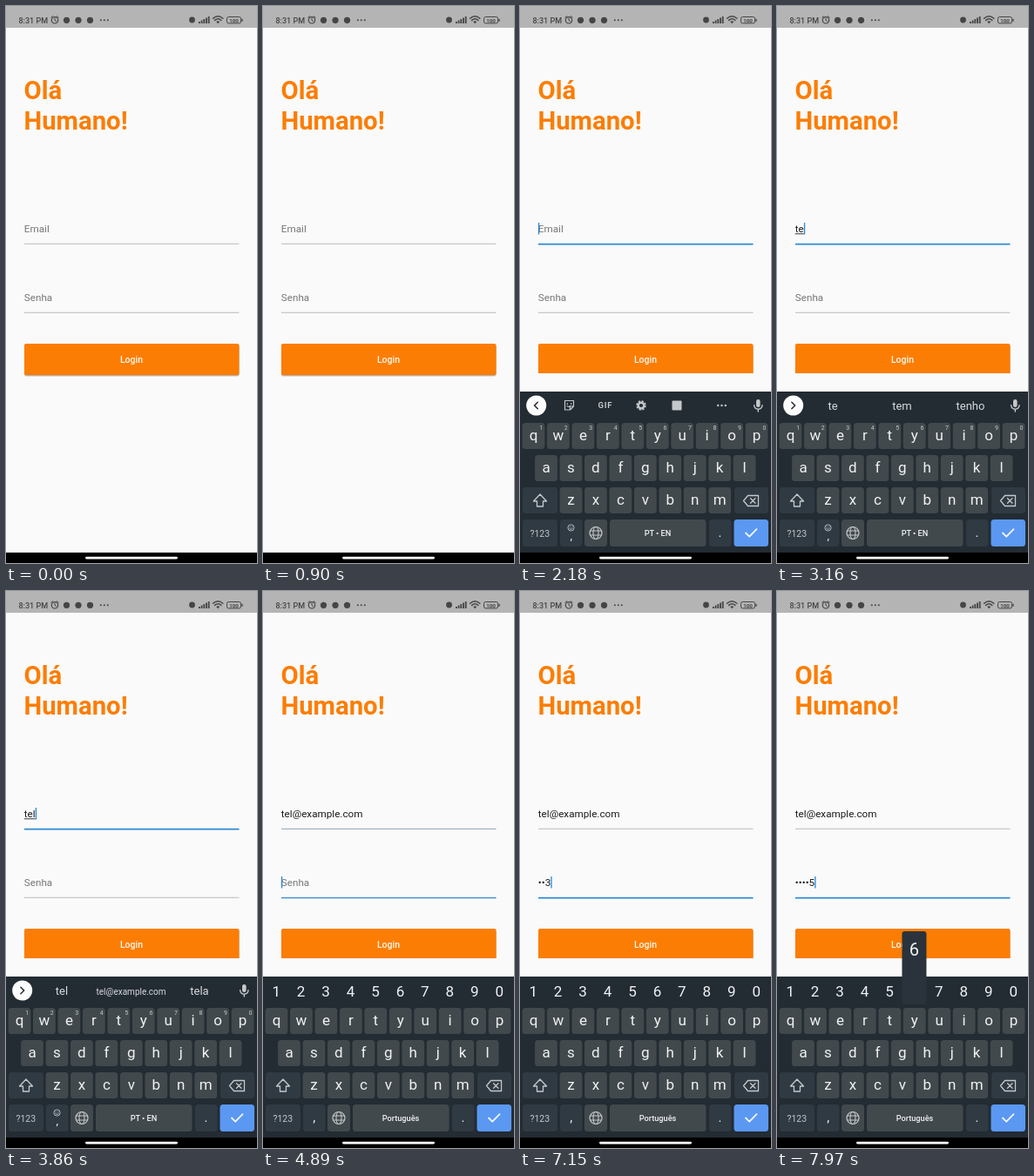
An HTML page for the animation above (8 s loop, 288x640 px).

```html
<!DOCTYPE html>
<html lang="pt">
<head>
<meta charset="utf-8">
<title>Login</title>
<style>
  html, body { margin: 0; width: 100%; height: 100%; overflow: hidden; background: #fafafa; }
  svg { display: block; width: 100%; height: 100%; }
  text { font-family: Roboto, "Noto Sans", sans-serif; }
</style>
</head>
<body>
<svg id="stage" viewBox="0 0 288 640" xmlns="http://www.w3.org/2000/svg"></svg>
<script>
const LOOP = 8000;
const KEYBOARD_START = 1810, KEYBOARD_TIME = 322, KEYBOARD_HEIGHT = 198;
const EMAIL = 'tel@example.com';
const FILL_AT = 4330, SWITCH_AT = 4760;
const C = {
  page: '#fafafa', orange: '#fc7d04', hint: '#777777', ink: '#1c1c1c', blue: '#2b88d4',
  board: '#232b33', key: '#42494d', fn: '#303a43', label: '#f0f2f3', dim: '#c4c8ca', status: '#454545'
};

// Key presses: character, finger down, finger up
const letters = [['t', 2760, 2850], ['e', 2990, 3080], ['l', 3290, 3380]];
const digits = [['1', 6230, 6320], ['2', 6740, 6830], ['3', 7010, 7100],
                ['4', 7570, 7660], ['5', 7760, 7850], ['6', 7940, 8030]];

const rect = (x, y, w, h, fill, r = 0, more = '') =>
  `<rect x="${x}" y="${y}" width="${w}" height="${h}" rx="${r}" fill="${fill}" ${more}/>`;
const circle = (x, y, r, fill) => `<circle cx="${x}" cy="${y}" r="${r}" fill="${fill}"/>`;
const text = (s, x, y, size, fill, more = '') =>
  `<text x="${x}" y="${y}" font-size="${size}" fill="${fill}" ${more}>${s}</text>`;
const mid = (s, x, y, size, fill = C.label, more = '') =>
  text(s, x, y, size, fill, 'text-anchor="middle" ' + more);
const line = (d, color, w = 1.3) =>
  `<path d="${d}" fill="none" stroke="${color}" stroke-width="${w}" stroke-linecap="round" stroke-linejoin="round"/>`;
const group = (id, body) => `<g id="${id}">${body}</g>`;
const dots = (x, y, gap, r, color) => [-1, 0, 1].map(i => circle(x + i * gap, y, r, color)).join('');

const rows = [
  { chars: '1234567890', x: 15.2, y: 460 },
  { chars: 'qwertyuiop', x: 15.5, y: 494 },
  { chars: 'asdfghjkl', x: 30, y: 531 },
  { chars: 'zxcvbnm', x: 58.5, y: 568 }
];
const PITCH = 28.45;
const keyPos = ch => {
  const row = rows.find(r => r.chars.includes(ch));
  return [row.x + PITCH * row.chars.indexOf(ch), row.y];
};

function statusBar() {
  const s = C.status;
  const bars = [2, 3.5, 5, 6.5, 8].map((h, i) => rect(221 + i * 2.7, 20 - h, 1.8, h, s)).join('');
  return rect(0, 0, 288, 25, '#b4b4b4') +
    text('8:31 PM', 14.5, 19.5, 9, s, 'font-weight="500"') +
    `<circle cx="56" cy="16.3" r="3.7" fill="none" stroke="${s}" stroke-width="1.2"/>` +
    line('M56 14.2V16.5L57.6 17.4M51.8 13.2L53.8 11.7M60.2 13.2L58.2 11.7', s, 1) +
    [69.5, 83, 96.5].map(x => circle(x, 16.3, 3.6, s)).join('') +
    dots(112.8, 16.3, 4, 1, s) + circle(213.5, 16, 3.4, s) + bars +
    line('M237.6 14.2Q243.2 9.2 248.8 14.2M239.6 16.4Q243.2 13.2 246.8 16.4', s, 1.5) +
    `<path d="M241.2 18Q243.2 16.3 245.2 18L243.2 20.2Z" fill="${s}"/>` +
    `<rect x="253.5" y="12.5" width="16" height="7.4" rx="2" fill="none" stroke="${s}"/>` +
    rect(270.4, 14.8, 1.3, 3, s) + mid('100', 261.5, 18.5, 6.2, s, 'font-weight="700"');
}

function page() {
  const field = (id, hint, y) =>
    text(hint, 20.8, y, 11.7, C.hint, `id="${id}Text"`) +
    `<path id="${id}Under" stroke="${C.ink}" stroke-width=".9"/>` +
    rect(21, y + 12.8, 246.5, .9, '#b4b4b8', 0, `id="${id}Line"`) +
    rect(21, y - 11, 1.3, 13.5, C.blue, 0, `id="${id}Caret"`);
  return rect(0, 0, 288, 640, C.page) +
    text('Olá', 20.5, 107.3, 29.3, C.orange, 'font-weight="700"') +
    text('Humano!', 20.5, 142, 29.3, C.orange, 'font-weight="700"') +
    field('email', 'Email', 260) + field('pass', 'Senha', 339) +
    `<clipPath id="cut">${rect(0, 0, 288, 430, '#000', 0, 'id="cutBox"')}</clipPath>` +
    `<g clip-path="url(#cut)">` +
    rect(21, 389.5, 246.5, 36.2, '#808080', 2.5, 'opacity=".3"') +
    rect(21, 388.6, 246.5, 36.2, '#806040', 2.5, 'opacity=".45"') +
    rect(21, 388, 246.5, 36, C.orange, 2) +
    mid('Login', 144, 410.2, 10.5, '#fffaf2', 'font-weight="500"') + '</g>';
}

function toolbar() {
  const d = C.dim;
  return line('M51.5 453.5H61.5V460L57.5 464H51.5ZM61.5 460H57.5V464M54.3 456.6V457.4M58.7 456.6V457.4M54 459.6Q56 461.4 57.5 459.6', d, 1.2) +
    mid('GIF', 97.8, 462.4, 9.4, d, 'font-weight="700" letter-spacing=".7"') +
    `<circle cx="139" cy="459" r="3.3" fill="none" stroke="${d}" stroke-width="2.4"/>` +
    `<circle cx="139" cy="459" r="5" fill="none" stroke="${d}" stroke-width="1.5" stroke-dasharray="2.3 1.627"/>` +
    rect(174.5, 453.5, 11, 11, d, 1) + dots(231.5, 459, 4.3, 1.2, d);
}

function keyboard() {
  const keys = rows.slice(1).map(({ chars, x, y }) => [...chars].map((ch, i) =>
    rect(x + PITCH * i - 12.9, y - 15, 25.8, 30, C.key, 3.5) +
    mid(ch, x + PITCH * i, y + 5.3, 17)).join('')).join('');
  const hints = [...rows[0].chars].map((n, i) => mid(n, 24.3 + PITCH * i, 487, 7, C.dim)).join('');
  const numbers = [...rows[0].chars].map((n, i) => mid(n, 15.2 + PITCH * i, 466, 17)).join('');
  const l = C.label, d = C.dim;
  return rect(0, 443, 288, 185, C.board) + rect(0, 628, 288, 12, '#000') + keys +
    rect(3, 553, 40, 30, C.fn, 3.5) + rect(246, 553, 39, 30, C.fn, 3.5) +
    line('M23 561L30.5 569H26.5V575H19.5V569H15.5Z', d) +
    line('M256.5 568.5L261.5 562.5H273.5V574.5H261.5ZM264.5 565.8L270 571.3M270 565.8L264.5 571.3', d) +
    rect(3, 590, 40, 31, C.fn, 3.5) + mid('?123', 22.8, 609.5, 10.5, d) +
    rect(46, 590, 25.5, 31, C.fn, 3.5) + rect(74, 590, 26, 31, C.key, 3.5) +
    rect(103, 590, 110.5, 31, C.key, 3.5) + rect(217, 590, 25.5, 31, C.fn, 3.5) +
    rect(245.5, 590, 39.5, 31, '#5a98f2', 3.5) +
    line('M259 605.5L263.2 609.7L271.5 601.2', '#f4f6ff', 1.8) + mid('.', 229.5, 610, 15) +
    `<circle cx="87" cy="605.5" r="7" fill="none" stroke="${d}" stroke-width="1.2"/>` +
    `<ellipse cx="87" cy="605.5" rx="3" ry="7" fill="none" stroke="${d}" stroke-width="1.1"/>` +
    line('M81 603H93M81 608H93', d, 1.1) +
    group('plain', hints +
      `<circle cx="58.5" cy="599.5" r="3.6" fill="none" stroke="${d}" stroke-width=".9"/>` +
      line('M57.2 598.5V598.8M59.8 598.5V598.8M56.8 600.6Q58.5 602.2 60.2 600.6', d, .9) +
      mid(',', 58.8, 612.5, 13) + mid('PT • EN', 158, 609, 9.2, l, 'font-weight="500"') +
      circle(18.7, 459, 11.5, '#fcfcfc') + group('chevron', line('M20.3 455.2L16.5 459L20.3 462.8', C.board, 1.5)) +
      rect(271, 452, 4.6, 9, d, 2.3) + line('M268.6 458.8Q269 463.2 273.3 463.2Q277.6 463.2 278 458.8M273.3 463.2V466', d, 1.4) +
      group('tools', toolbar()) +
      group('words', [64, 143.5, 222].map((x, i) => mid('', x, 463.7, 13, '#d8dcde', `id="word${i}"`)).join(''))) +
    group('secure', numbers + mid(',', 58.8, 609.5, 15) + mid('Português', 158, 609, 9.2, l, 'font-weight="500"'));
}

const stage = document.getElementById('stage');
stage.innerHTML = page() + statusBar() + rect(0, 628, 288, 12, '#000') +
  group('keyboard', keyboard()) +
  group('popup', rect(-14, -69, 28, 84, '#2a333b', 3) + mid('', 0, -41.5, 20, C.label, 'id="popupChar"')) +
  rect(91, 632.7, 106, 2.8, '#fff', 1.4);

const $ = id => document.getElementById(id);
const show = (id, on) => $(id).setAttribute('display', on ? 'inline' : 'none');
const set = (id, attrs) => { for (const k in attrs) $(id).setAttribute(k, attrs[k]); };
const clamp = v => Math.max(0, Math.min(1, v));
const put = (id, s) => { if ($(id).textContent !== s) $(id).textContent = s; };
const typed = (list, t) => list.filter(k => k[2] <= t);

function mix(p) {
  const from = [180, 180, 184], to = [43, 136, 212];
  return `rgb(${from.map((v, i) => Math.round(v + (to[i] - v) * p))})`;
}

function drawField(id, value, hint, focus, focused, caretTime, y, composing) {
  put(id + 'Text', value || hint);
  set(id + 'Text', { fill: value ? C.ink : C.hint });
  const w = value ? $(id + 'Text').getComputedTextLength() : 0;
  set(id + 'Line', { height: .9 + .8 * focus, fill: mix(focus) });
  set(id + 'Caret', { x: 20.9 + w });
  show(id + 'Caret', focused && caretTime % 1000 < 500);
  set(id + 'Under', { d: composing && value ? `M20.8 ${y + 1.8}h${w}` : '' });
}

const suggestions = [[], ['t', 'te', 'tudo'], ['te', 'tem', 'tenho'], ['tel', EMAIL, 'tela']];

function draw(t) {
  const shift = KEYBOARD_HEIGHT * (1 - clamp((t - KEYBOARD_START) / KEYBOARD_TIME)) ** 2;
  set('keyboard', { transform: `translate(0 ${Math.round(shift)})` });
  show('keyboard', t >= KEYBOARD_START);
  set('cutBox', { height: shift > 0 ? 430 : 422 });

  const onPass = t >= SWITCH_AT, filled = t >= FILL_AT;
  const word = typed(letters, t), code = typed(digits, t);
  const swap = clamp((t - SWITCH_AT) / 170);
  const focusIn = clamp((t - KEYBOARD_START + 40) / 150);

  const lastLetter = filled ? FILL_AT : word.length ? word[word.length - 1][2] : KEYBOARD_START;
  const email = filled ? EMAIL : word.map(k => k[0]).join('');
  drawField('email', email, 'Email', focusIn * (1 - swap), t >= KEYBOARD_START && !onPass,
    t - lastLetter, 260, !filled);

  const last = code[code.length - 1];
  const masked = last && t - last[2] > 1500;
  const pass = last ? '•'.repeat(code.length - 1) + (masked ? '•' : last[0]) : '';
  drawField('pass', pass, 'Senha', swap, onPass, t - (last ? last[2] : SWITCH_AT), 339, false);

  const words = filled ? [] : suggestions[word.length];
  show('plain', !onPass);
  show('secure', onPass);
  show('tools', !words.length);
  show('words', words.length);
  set('chevron', { transform: words.length ? 'rotate(180 18.6 459)' : '' });
  words.forEach((s, i) => {
    put('word' + i, s);
    set('word' + i, { 'font-size': s.length > 10 ? 10 : 13 });
  });

  const pressed = [...letters, ...digits].find(k => t >= k[1] && t < k[2]);
  show('popup', pressed);
  if (pressed) {
    put('popupChar', pressed[0]);
    set('popup', { transform: `translate(${keyPos(pressed[0])})` });
  }
}

const start = performance.now();
function tick() {
  draw((performance.now() - start) % LOOP);
  requestAnimationFrame(tick);
}
tick();
</script>
</body>
</html>
```
